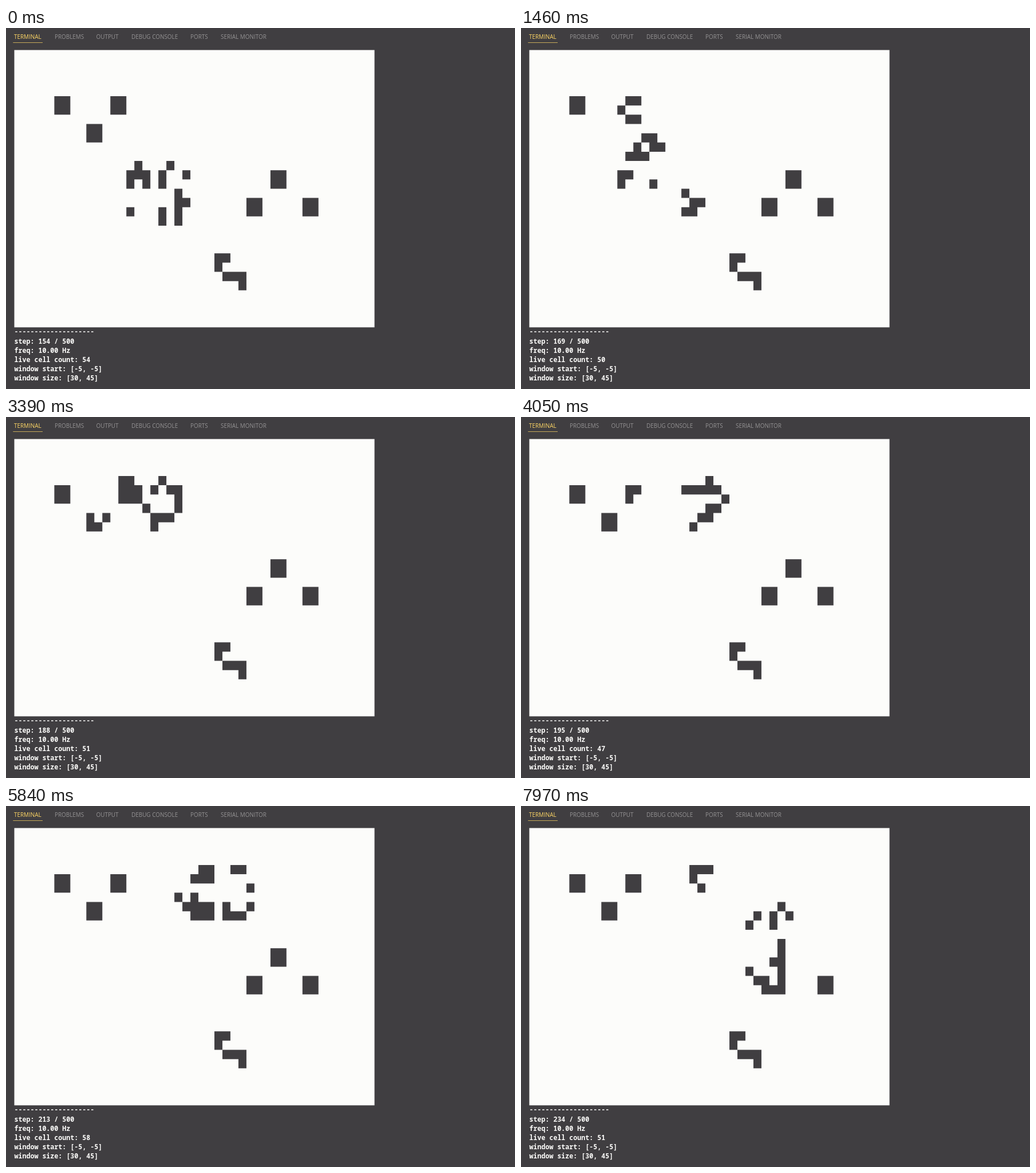
Recreate the animation shown at these times as an HTML page with a canvas. Size 889 px wide and 630 px high, loop 8 s.

```html
<!DOCTYPE html>
<html lang="en">
<head>
<meta charset="utf-8">
<title>Life in a terminal</title>
<style>
  html, body { margin: 0; width: 100%; height: 100%; overflow: hidden; background: #403e41; }
  canvas { position: absolute; left: 0; top: 0; }
  .tab {
    position: absolute; top: 8px; line-height: 14px; white-space: pre;
    font-family: "Open Sans", sans-serif; font-size: 9.92px; color: #939293;
  }
  .tab.on { color: #ffd866; }
  #log {
    position: absolute; left: 14.5px; top: 522.4px; margin: 0; line-height: 16.131px;
    font-family: "Noto Sans Mono", monospace; font-size: 11.65px; font-weight: 600; color: #fcfcfa;
  }
</style>
</head>
<body>
<canvas id="board" width="889" height="630"></canvas>
<div class="tab on" style="left:14px">TERMINAL</div>
<div class="tab" style="left:85px">PROBLEMS</div>
<div class="tab" style="left:157.5px">OUTPUT</div>
<div class="tab" style="left:219px">DEBUG CONSOLE</div>
<div class="tab" style="left:322px">PORTS</div>
<div class="tab" style="left:375px">SERIAL MONITOR</div>
<pre id="log"></pre>
<script>
const ROWS = 30, COLS = 45;
const LEFT = 14.5, TOP = 38.45, CELL_W = 13.98, CELL_H = 16.131;
const DARK = '#403e41', LIGHT = '#fcfcfa', GOLD = '#ffd866';
const LOOP = 8000, TICK = 66.38, FIRST = 154, STEPS = 80;
const AWAY = 5; // a glider that has left the window still counts as live

const ctx = document.getElementById('board').getContext('2d');
const log = document.getElementById('log');
const at = (r, c) => r * COLS + c;

function seed() {
  const g = new Uint8Array(ROWS * COLS);
  const put = (r, ...cols) => cols.forEach(c => { g[at(r, c)] = 1; });
  const block = (r, c) => { put(r, c, c + 1); put(r + 1, c, c + 1); };

  block(5, 5); block(5, 12); block(8, 9);
  block(13, 32); block(16, 29); block(16, 36);
  // eater
  put(22, 25, 26); put(23, 25); put(24, 26, 27, 28); put(25, 28);
  // active core
  put(12, 15, 19);
  put(13, 14, 15, 16, 18, 21);
  put(14, 14, 16, 18);
  put(15, 20);
  put(16, 20, 21);
  put(17, 14, 18, 20);
  put(18, 18, 20);
  return g;
}

function evolve(g) {
  const next = new Uint8Array(g.length);
  for (let r = 0; r < ROWS; r++) {
    for (let c = 0; c < COLS; c++) {
      let n = -g[at(r, c)];
      for (let y = Math.max(0, r - 1); y <= Math.min(ROWS - 1, r + 1); y++)
        for (let x = Math.max(0, c - 1); x <= Math.min(COLS - 1, c + 1); x++)
          n += g[at(y, x)];
      next[at(r, c)] = n === 3 || (n === 2 && g[at(r, c)]) ? 1 : 0;
    }
  }
  return next;
}

const history = [seed()];
while (history.length <= STEPS) history.push(evolve(history[history.length - 1]));

function draw(step) {
  const g = history[step];
  let live = AWAY;
  ctx.clearRect(0, 0, 889, 630);
  ctx.fillStyle = GOLD;
  ctx.fillRect(12.3, 25.1, 51.7, 0.7);
  ctx.fillStyle = LIGHT;
  ctx.fillRect(LEFT, TOP, COLS * CELL_W, ROWS * CELL_H);

  // One path for all cells keeps shared edges free of seams.
  ctx.beginPath();
  for (let r = 0; r < ROWS; r++) {
    for (let c = 0; c < COLS; c++) {
      if (!g[at(r, c)]) continue;
      live++;
      ctx.rect(LEFT + c * CELL_W, TOP + r * CELL_H, CELL_W, CELL_H);
    }
  }
  ctx.fillStyle = DARK;
  ctx.fill();

  log.textContent = [
    '-'.repeat(20),
    `step: ${FIRST + step} / 500`,
    'freq: 10.00 Hz',
    `live cell count: ${live}`,
    'window start: [-5, -5]',
    'window size: [30, 45]'
  ].join('\n');
}

// Two steps in every three screen ticks.
function stepAt(ms) {
  const n = Math.floor((ms + 5) / TICK);
  return Math.min(STEPS, Math.floor(n / 3) * 2 + (n % 3 ? 1 : 0));
}

let shown = -1;
const start = performance.now();
function frame() {
  const step = stepAt((performance.now() - start) % LOOP);
  if (step !== shown) draw(shown = step);
  requestAnimationFrame(frame);
}
frame();
</script>
</body>
</html>
```
